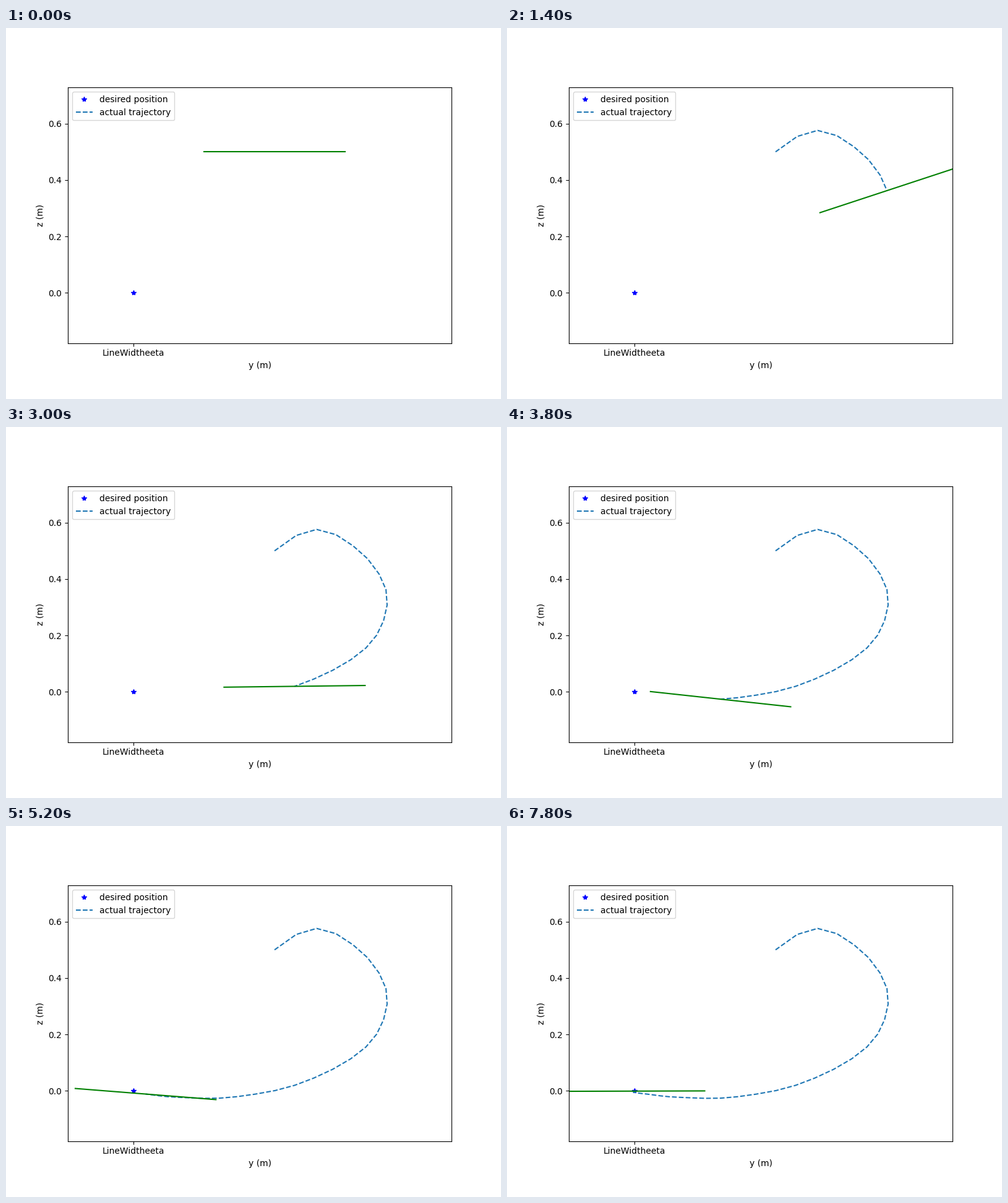
Write a matplotlib script that moves like this. It is 800x600 px and loops after 8 s.

```python
import numpy as np
import matplotlib.pyplot as plt
from matplotlib.animation import FuncAnimation

N_FRAMES = 40
INTERVAL = 200
ARM = 0.25                              # half span of the vehicle, m
SCALE = 456                             # pixels per metre
LEFT, BOTTOM, WIDTH, HEIGHT = 100, 90.3, 620, 413.4
GOAL = 206, 171.7                       # desired point, pixels from bottom left

# key poses: step, y (m), z (m), tilt (rad)
KEYS = np.array([
    (0, 0.5, 0.5, 0),
    (2, 0.649, 0.576, 0.12),
    (4, 0.778, 0.518, 0.27),
    (7, 0.895, 0.3625, 0.318),
    (10, 0.862, 0.201, 0.22),
    (15, 0.571, 0.0195, 0.012),
    (18, 0.364, -0.021, -0.09),
    (22, 0.16, -0.023, -0.122),
    (26, 0.043, -0.0114, -0.079),
    (30, 0.002, -0.006, -0.038),
    (34, -0.004, -0.003, -0.011),
    (39, -0.001, -0.001, 0.003),
])


def ease(t, knots, vals):
    """Cubic Hermite curve through the knots."""
    slope = np.gradient(vals, knots, edge_order=2)
    i = np.clip(np.searchsorted(knots, t, side="right") - 1, 0, len(knots) - 2)
    h = knots[i + 1] - knots[i]
    s = (t - knots[i]) / h
    return ((1 + 2 * s) * (1 - s) ** 2 * vals[i]
            + s * (1 - s) ** 2 * h * slope[i]
            + s * s * (3 - 2 * s) * vals[i + 1]
            + s * s * (s - 1) * h * slope[i + 1])


def limits(start, size, goal):
    return (start - goal) / SCALE, (start + size - goal) / SCALE


steps = np.arange(N_FRAMES)
y, z, tilt = (ease(steps, KEYS[:, 0], col) for col in KEYS.T[1:])

plt.rcParams["font.family"] = "DejaVu Sans"
fig = plt.figure(figsize=(8, 6), dpi=100)
ax = fig.add_axes([LEFT / 800, BOTTOM / 600, WIDTH / 800, HEIGHT / 600])
ax.set_xlim(limits(LEFT, WIDTH, GOAL[0]))
ax.set_ylim(limits(BOTTOM, HEIGHT, GOAL[1]))
ax.set_xticks([0], ["LineWidtheeta"])
ax.set_yticks([0.0, 0.2, 0.4, 0.6])
ax.set_xlabel("y (m)")
ax.set_ylabel("z (m)")

ax.plot([0], [0], "b*", label="desired position")
trail, = ax.plot([], [], "--", color="C0", label="actual trajectory")
body, = ax.plot([], [], color="green")
ax.legend(loc="upper left")


def update(k):
    trail.set_data(y[:k + 1], z[:k + 1])
    dy, dz = ARM * np.cos(tilt[k]), ARM * np.sin(tilt[k])
    body.set_data([y[k] - dy, y[k] + dy], [z[k] - dz, z[k] + dz])
    return trail, body


anim = FuncAnimation(fig, update, frames=N_FRAMES, interval=INTERVAL,
                     repeat=True, repeat_delay=0)
plt.show()
```
